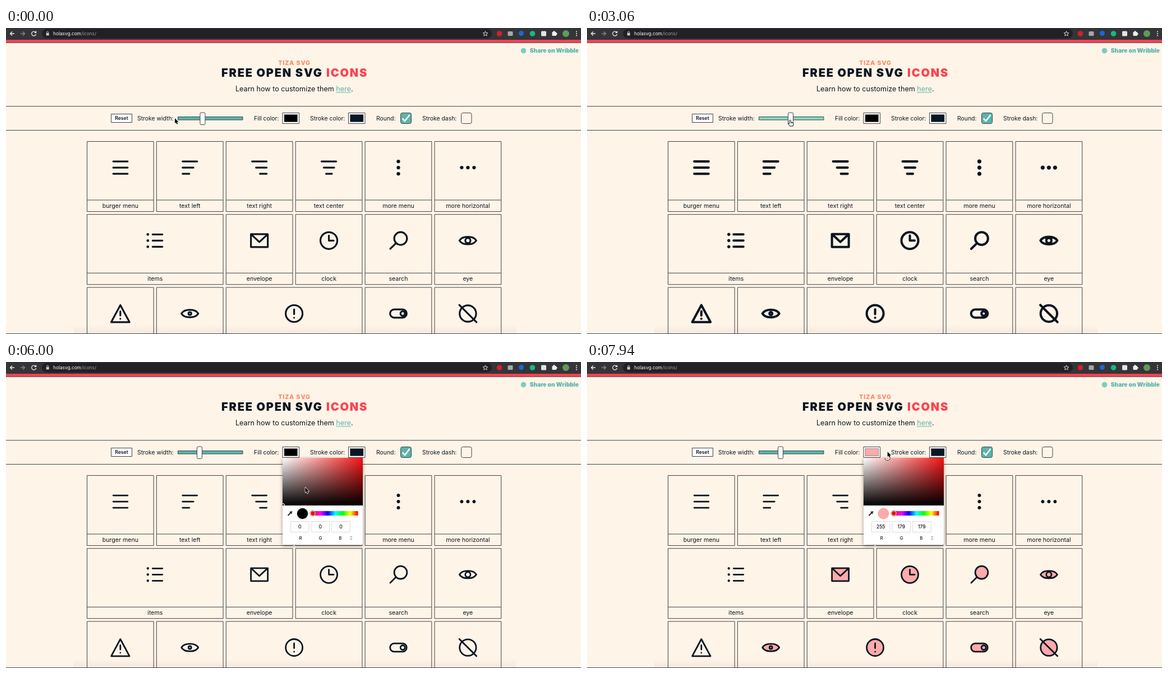
Write an HTML page with a canvas that moves like this. It is 1025 px wide and 546 px high and loops after 8000 ms.

```html
<!DOCTYPE html>
<html lang="en">
<head>
<meta charset="utf-8">
<title>Free open SVG icons</title>
<style>
html, body { margin: 0; width: 100%; height: 100%; overflow: hidden; background: #fff4e8; }
canvas { display: block; }
</style>
</head>
<body>
<canvas id="stage" width="1025" height="546"></canvas>
<script>
const ctx = document.getElementById('stage').getContext('2d');
const LOOP = 8000, TAU = Math.PI * 2;
const INK = '#0b1520', LINE = '#3e4247', CREAM = '#fff4e8', TEAL = '#5ab4ac', MINT = '#84d9bd', RED = '#ff404f';
const PICK = { x: 493, y: 171, w: 143, h: 85 };
const OPEN_AT = 5720, PICK_AT = 6150;

// Keys: time, then values
const cursorKeys = [
  [0, 301, 161], [600, 352, 164], [850, 352, 164], [1440, 369, 164], [2050, 412, 164],
  [2500, 395, 164], [3500, 347, 164], [4150, 347, 164], [4900, 470, 160], [5300, 511, 156],
  [5700, 511, 156], [6100, 540, 236], [6500, 550, 218.7], [7100, 547, 192], [7900, 535.7, 160], [8000, 535.7, 160]
];
const thumbKeys = [[0, 350.5], [850, 350.5], [1440, 367], [2050, 412], [2500, 399], [3500, 345], [8000, 345]];

const clamp = (v, a, b) => Math.min(b, Math.max(a, v));

// Smooth curve through the keys that never overshoots
function sample(keys, t, k) {
  let i = 0;
  while (i < keys.length - 2 && t >= keys[i + 1][0]) i++;
  const rate = j => j < 0 || j > keys.length - 2 ? 0
    : (keys[j + 1][k] - keys[j][k]) / (keys[j + 1][0] - keys[j][0]);
  const slope = j => {
    const a = rate(j - 1), b = rate(j);
    return a * b <= 0 ? 0 : 2 * a * b / (a + b);
  };
  const [a, b] = [keys[i], keys[i + 1]], d = b[0] - a[0], u = clamp((t - a[0]) / d, 0, 1);
  const h = u * u * (3 - 2 * u);
  return a[k] * (1 - h) + b[k] * h + d * u * (1 - u) * (slope(i) * (1 - u) - slope(i + 1) * u);
}

const circle = (x, y, r) => `M${x - r} ${y}a${r} ${r} 0 1 1 ${2 * r} 0a${r} ${r} 0 1 1 ${-2 * r} 0`;
const dots = (list, r) => list.map(([x, y]) => circle(x, y, r)).join('');
const lens = 'M-15 0C-10-8.9 10-8.9 15 0C10 8.9-10 8.9-15 0Z';

// Label, column, row, span, path around the centre, kind
const icons = [
  ['burger menu', 0, 0, 1, 'M-12.7-11H13M-12.7 0H13M-12.7 11H13'],
  ['text left', 1, 0, 1, 'M-13-11H13M-13 0H6.5M-13 11H-1'],
  ['text right', 2, 0, 1, 'M-13-11H13M-6 0H13M1 11H13'],
  ['text center', 3, 0, 1, 'M-13-11H13M-9 0H9.5M-5 11H5.5'],
  ['more menu', 4, 0, 1, dots([[0, -11], [0, 0], [0, 11]], 1.6), 'solid'],
  ['more horizontal', 5, 0, 1, dots([[-11, 0], [0, 0], [11, 0]], 1.6), 'solid'],
  ['items', 0, 1, 2, dots([[-13, -11], [-13, 0], [-13, 11]], .8) + 'M-4.5-11H13M-4.5 0H13M-4.5 11H13', 'solid'],
  ['envelope', 2, 1, 1, 'M-15-11.5H15V11.5H-15ZM14.5-11L0 2.5L-14.5-11', 'fill'],
  ['clock', 3, 1, 1, circle(0, 0, 15) + 'M8.5 0H0V-9', 'fill'],
  ['search', 4, 1, 1, circle(4, -3.7, 11.4) + 'M-4 4.3L-14.5 14.7', 'fill'],
  ['eye', 5, 1, 1, lens + circle(0, 0, 4.6), 'fill'],
  ['', 0, 2, 1, 'M0-15L16.3 15.3H-16.3ZM0-4V3.5M0 9.3h.01'],
  ['', 1, 2, 1, lens + circle(0, 0, 2.5), 'fill'],
  ['', 2, 2, 2, circle(0, 0, 15) + 'M0-7.5V1M0 7.5h.01', 'fill'],
  ['', 4, 2, 1, 'M-7.5-7.3H7.5a7.3 7.3 0 0 1 0 14.6H-7.5a7.3 7.3 0 0 1 0-14.6Z' + circle(7.7, 0, 4), 'fill'],
  ['', 5, 2, 1, circle(0, 0, 14.7) + 'M-15.3-15.3L15.3 15.3', 'fill']
].map(([label, col, row, span, d, kind]) => ({ label, col, row, span, path: new Path2D(d), kind }));

const arrow = new Path2D('M0 0V9.2L2 7.4L3.6 10.8L5.2 10L3.7 6.8H6.6Z');
const hand = new Path2D('M-1.3 1Q0-.9 1.3 1V4L5 4.8Q6.2 5.3 6 7L5 11H-.3L-3.3 7.2Q-3.4 5.3-1.3 6.8Z');

function rect(x, y, w, h, fill, stroke, r = 0, lw = 1) {
  ctx.beginPath();
  ctx.roundRect(x, y, w, h, r);
  if (fill) { ctx.fillStyle = fill; ctx.fill(); }
  if (stroke) { ctx.strokeStyle = stroke; ctx.lineWidth = lw; ctx.stroke(); }
}

function disc(x, y, r, fill, stroke, lw = 1) {
  ctx.beginPath();
  ctx.arc(x, y, r, 0, TAU);
  if (fill) { ctx.fillStyle = fill; ctx.fill(); }
  if (stroke) { ctx.strokeStyle = stroke; ctx.lineWidth = lw; ctx.stroke(); }
}

function trace(d, color, lw) {
  ctx.strokeStyle = color;
  ctx.lineWidth = lw;
  ctx.stroke(typeof d === 'string' ? new Path2D(d) : d);
}

function text(s, x, y, size, color = INK, weight = 400, align = 'left', spacing = 0) {
  ctx.font = `${weight} ${size}px Inter, "Open Sans", sans-serif`;
  ctx.letterSpacing = spacing + 'px';
  ctx.textAlign = align;
  ctx.fillStyle = color;
  ctx.fillText(s, x, y);
  return ctx.measureText(s).width;
}

function blend(x0, y0, x1, y1, colors) {
  const g = ctx.createLinearGradient(x0, y0, x1, y1);
  colors.forEach((c, i) => g.addColorStop(i / (colors.length - 1), c));
  return g;
}

function browserBar() {
  rect(0, 0, 1025, 21, '#343538');
  rect(64, 1.5, 802, 17, '#202124', null, 8.5);
  trace('M15 10H7.5M11 6.5L7.5 10L11 13.5', '#eee', 1.3);
  trace('M26 10H33.5M30 6.5L33.5 10L30 13.5', '#85878a', 1.3);
  trace('M52.8 7.5A4 4 0 1 0 53.6 11M53.6 5.5V8.3H50.6', '#eee', 1.3);
  rect(71.7, 9, 5, 4.4, '#c8cacc');
  trace('M72.7 9V7.7a1.5 1.5 0 0 1 3 0V9', '#c8cacc', 1);
  const w = text('holasvg.com', 84, 13, 8.3, '#fff');
  text('/icons/', 84 + w, 13, 8.3, '#9aa0a6');
  ctx.beginPath();
  for (let i = 0; i < 10; i++) {
    const a = i * TAU / 10 - Math.PI / 2, r = i % 2 ? 2 : 4.6;
    ctx.lineTo(854.5 + r * Math.cos(a), 10.3 + r * Math.sin(a));
  }
  ctx.closePath();
  ctx.strokeStyle = '#ddd';
  ctx.lineWidth = 1;
  ctx.stroke();
  disc(879.5, 10, 4.8, '#d3202b');
  rect(894.5, 6, 9, 8, '#a4a9a8', null, 1.5);
  disc(918.5, 9.5, 4.5, '#1c67d8');
  disc(938.5, 10, 4.8, '#16b886');
  rect(954, 5.5, 9, 9, '#e4e4e4', null, 1.5);
  rect(973.5, 7, 7.5, 7, '#eee', null, 1);
  disc(977, 6.8, 1.7, '#eee');
  disc(981, 10.5, 1.7, '#eee');
  disc(998, 10, 6, '#5f9a58');
  for (const y of [6.5, 10, 13.5]) disc(1017, y, 1.1, '#eee');
  rect(0, 21, 1025, 5, RED);
  rect(0, 25.7, 1025, 1, LINE);
}

function header() {
  disc(922.5, 40.5, 4.8, '#77cfc0');
  text('Share on Wribble', 1021, 43.7, 10.2, TEAL, 900, 'right');
  text('TIZA SVG', 514, 65.8, 10.4, '#ff855b', 800, 'center', 1);
  text('FREE OPEN SVG', 384, 87, 20, INK, 900, 'left', 1.8);
  text('ICONS', 645, 87, 20, RED, 900, 'right', 1.8);
  let x = 409;
  x += text('Learn how to customize them ', x, 113, 12.6);
  const w = text('here', x, 113, 12.6, TEAL);
  rect(x, 114.5, w, 1, TEAL);
  text('.', x + w, 113, 12.6);
}

function swatch(x, color) {
  rect(x, 151.5, 29.5, 19, '#fff', LINE);
  rect(x + 3, 154.5, 23.5, 13, color, '#555', 0, .6);
}

function controls(thumb, hover, fill) {
  rect(0, 139.3, 1025, 1, LINE);
  rect(0, 182, 1025, 1, LINE);
  rect(187.5, 153.5, 37, 15, '#fff', LINE);
  text('Reset', 206, 164.2, 8.6, INK, 600, 'center');
  const labels = { 'Stroke width:': 234, 'Fill color:': 442, 'Stroke color:': 542, 'Round:': 660, 'Stroke dash:': 742 };
  for (const s in labels) text(s, labels[s], 164.8, 10.4);
  rect(306.5, 158.5, 115.5, 5.5, hover ? MINT : TEAL, LINE);
  rect(thumb - 4.5, 151, 9, 21.5, '#fff', LINE, 2);
  swatch(493, fill || '#000');
  swatch(610.5, '#081725');
  rect(703.5, 151.5, 19, 19, TEAL, LINE, 3);
  trace('M706.8 161.5L711 166L719.5 155', '#fff', 2.6);
  rect(811.5, 151.5, 18.5, 19, CREAM, LINE, 3);
}

function cards(lw, fill) {
  for (const { label, col, row, span, path, kind } of icons) {
    const x = 144.5 + 123.9 * col, y = 202.5 + 130.2 * row, w = 118.7 + 123.9 * (span - 1);
    rect(x, y, w, 125, null, LINE);
    rect(x, y + 104, w, 1, LINE);
    text(label, x + w / 2, y + 118.5, 10.6, INK, 400, 'center');
    ctx.save();
    ctx.translate(x + w / 2, y + 46.6);
    ctx.lineCap = ctx.lineJoin = 'round';
    if (kind === 'solid' || kind === 'fill' && fill) {
      ctx.fillStyle = kind === 'solid' ? INK : fill;
      ctx.fill(path);
    }
    trace(path, INK, lw);
    ctx.restore();
  }
  rect(120, 530, 790, 15, blend(0, 530, 0, 545, ['#6b504000', '#6b504012']));
  rect(0, 545, 1025, 1, LINE);
}

function picker(ring, rgb, fill) {
  const { x, y, w, h } = PICK;
  ctx.save();
  ctx.shadowColor = '#0006';
  ctx.shadowBlur = 6;
  ctx.shadowOffsetY = 2;
  rect(x, y, w, 155, '#fff');
  ctx.restore();
  rect(x, y, w, h, blend(x, 0, x + w, 0, ['#fff', '#f41414']));
  rect(x, y, w, h, blend(0, y, 0, y + h, ['#0000', '#000']));
  ctx.save();
  ctx.beginPath();
  ctx.rect(x, y, w, h);
  ctx.clip();
  disc(ring.x, ring.y, 4.4, null, '#111', 1.2);
  disc(ring.x, ring.y, 3.3, fill, '#fff', 1.3);
  ctx.restore();
  trace('M502.5 274L507.5 269M506 267L509.5 270.5M508 268.5L510 266.5', '#222', 1.8);
  disc(528.5, 270.5, 9.7, fill, '#0003', .6);
  rect(544, 266, 83.5, 8, blend(547, 0, 627, 0, ['#f00', '#f0f', '#00f', '#0ff', '#0f0', '#ff0', '#f00']));
  disc(547, 270, 5, '#fff', '#555', .7);
  disc(547, 270, 3.7, '#f00');
  rgb.forEach((v, i) => {
    const left = 507.5 + 36.6 * i;
    rect(left, 284.5, 32.5, 19, '#fff', '#dcdcdc');
    text(v, left + 16.2, 297.2, 8.5, '#111', 500, 'center');
    text('RGB'[i], 525 + 35.4 * i, 317, 8, '#222', 500, 'center');
  });
  trace('M613.7 313L615.2 311.3L616.7 313M613.7 315L615.2 316.7L616.7 315', '#333', .8);
}

function pointer(x, y, shape) {
  ctx.save();
  ctx.translate(x, y);
  ctx.lineJoin = 'round';
  if (shape === hand) {
    ctx.fillStyle = '#fff';
    ctx.fill(hand);
    trace(hand, '#111', 1);
    trace('M1.3 4V6.5M3.2 4.6V6.7', '#111', .6);
  } else {
    trace(arrow, '#fff', 1.4);
    ctx.fillStyle = '#000';
    ctx.fill(arrow);
  }
  ctx.restore();
}

// The screen shows colours a little deeper than their numbers
const shown = v => Math.round(255 * (v / 255) ** 1.15);

function draw(t) {
  const x = sample(cursorKeys, t, 1), y = sample(cursorKeys, t, 2), thumb = sample(thumbKeys, t, 1);
  const hover = x > 306 && x < 423 && y > 150 && y < 174;
  const picked = t >= PICK_AT;
  const ring = picked
    ? { x: clamp(x, PICK.x, PICK.x + PICK.w), y: clamp(y, PICK.y, PICK.y + PICK.h) }
    : { x: PICK.x, y: PICK.y + PICK.h };
  const sat = (ring.x - PICK.x) / PICK.w, val = 1 - (ring.y - PICK.y) / PICK.h;
  const red = Math.round(255 * val), low = Math.round(255 * val * (1 - sat));
  const rgb = [red, low, low], color = `rgb(${rgb.map(shown)})`, fill = picked ? color : null;

  rect(0, 0, 1025, 546, CREAM);
  browserBar();
  header();
  controls(thumb, hover, fill);
  cards(.4 + .072 * (thumb - 312), fill);
  if (t >= OPEN_AT) picker(ring, rgb, color);
  pointer(x, y, hover ? hand : arrow);
}

const start = performance.now();
function tick() {
  draw((performance.now() - start) % LOOP);
  requestAnimationFrame(tick);
}
tick();
</script>
</body>
</html>
```
